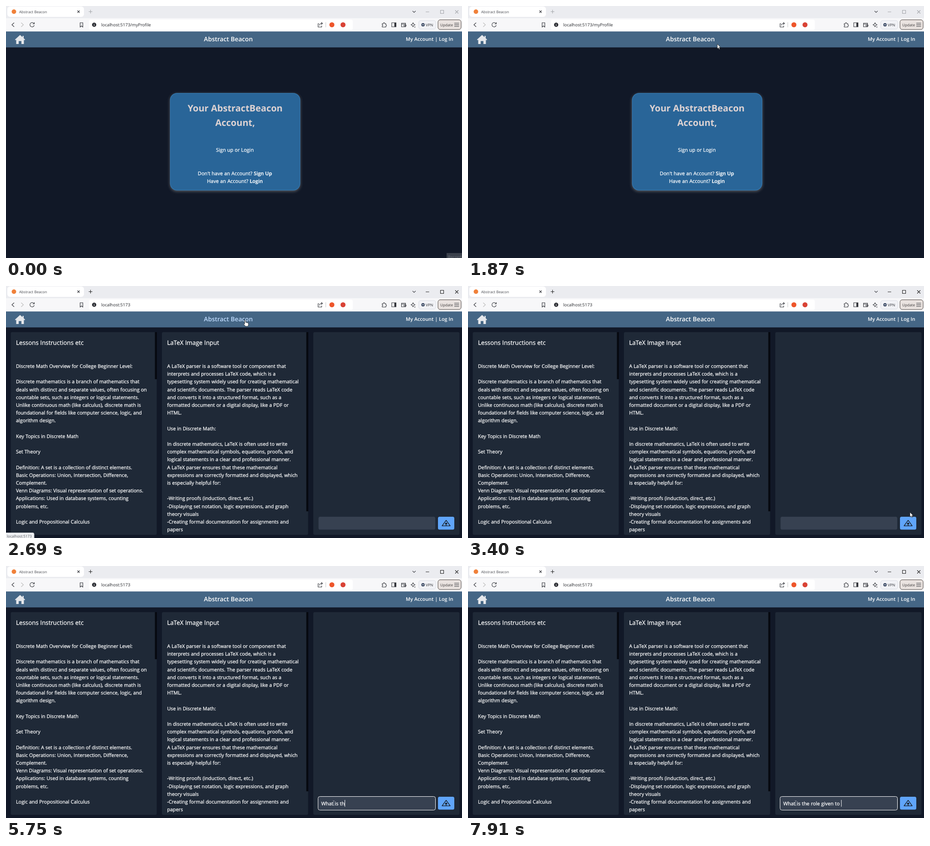
Write an HTML page that moves like this. It is 1006x557 px and loops after 8 s.

```html
<!DOCTYPE html>
<html lang="en">
<head>
<meta charset="utf-8">
<title>Abstract Beacon</title>
<style>
html, body { margin: 0; width: 100%; height: 100%; overflow: hidden; background: #111827; }
svg { display: block; width: 1006px; height: 557px; font: 10.8px "Open Sans", "Noto Sans", sans-serif; word-spacing: .2px; text-rendering: geometricPrecision; }
text { white-space: pre; }
.mid { text-anchor: middle; }
.bold { font-weight: 600; }
.line { fill: none; stroke: #33353b; stroke-width: 1.1; }
#lessons text, #profile text { stroke: #fff; stroke-width: .28px; }
#profile .heading text { stroke: none; }
#card { filter: drop-shadow(0 2px 3px #8a8a8a99); }
</style>
</head>
<body>
<svg viewBox="0 0 1006 557">
  <rect width="1006" height="557" fill="#111827"/>

  <!-- browser window -->
  <rect width="1006" height="28" fill="#ebecf0"/>
  <rect y="27" width="1006" height="30" fill="#f7f7f9"/>
  <rect x="3" y="1" width="169" height="23" rx="6" fill="#fff"/>
  <circle cx="17.5" cy="12.5" r="5" fill="#f0813a"/>
  <text x="29" y="16" font-size="8.1" fill="#44474d">Abstract Beacon</text>
  <path class="line" d="M157.5 10l5 5m0-5l-5 5"/>
  <path class="line" d="M897 11l3.3 3.3 3.3-3.3"/>
  <path id="controls" class="line" d="M182.5 12.5h8m-4-4v8M926 13h7.5M958.5 9.5h7v7h-7zM991 9.5l7 7m0-7l-7 7"/>

  <g class="line">
    <path d="M18 37l-5 4.500 5 4.500"/>
    <path d="M33.500 37l5 4.500-5 4.500" stroke="#bbb"/>
    <path d="M61.500 38.500a4.800 4.800 0 1 0 .8 4M62.500 36v3.500h-3.500"/>
    <path d="M163.500 37h6v9.500l-3-2.500-3 2.500z"/>
  </g>
  <rect x="183" y="30" width="582" height="23" rx="4" fill="#fff"/>
  <circle cx="194.5" cy="41.5" r="4.7" fill="#303238"/>
  <path d="M194.5 39v1m0 1v3" stroke="#fff"/>
  <text id="url" x="210" y="44.7" font-size="9.5" fill="#24262b"></text>
  <g class="line">
    <path d="M690.5 39h-2v7.5h8v-3M691 43c.5-3 2.5-4.5 7-4.5m-2.5-2.5l2.7 2.5-2.7 2.5"/>
    <path d="M705.5 36v11" stroke="#ccc"/>
    <path d="M830 39h2.5c-.5-3 3.5-3 3 0h2.5v2.5c2 0 2 3 0 3v2h-8v-2.5c2 0 2-2.5 0-2.5z"/>
    <path d="M851 37h9.5v9h-9.5z"/>
    <path d="M858.5 37v9" stroke-width="3.5"/>
    <path d="M872.5 38h9v8h-9zM872.5 40h9M878 42h4.5v2.5h-4.5z"/>
    <path d="M898 36.5q.7 4.3 5 5-4.3.7-5 5-.7-4.3-5-5 4.3-.7 5-5zM902 45v3"/>
  </g>
  <circle cx="719" cy="41.5" r="5.5" fill="#ee562b"/>
  <circle cx="743.5" cy="41.5" r="5.5" fill="#d94336"/>
  <rect x="910.5" y="32" width="38" height="19" rx="5" fill="#f1f2f6" stroke="#d9dce4"/>
  <circle cx="920" cy="41.5" r="3.8" fill="#42506a"/>
  <path d="M918 41.5h4" stroke="#fff"/>
  <text x="926" y="44.7" font-size="8.4" fill="#303238">VPN</text>
  <rect x="953" y="30.5" width="51" height="21.5" rx="5" fill="#e9e2df" stroke="#4d4540"/>
  <text x="958" y="44.6" font-size="8.2" fill="#3c3a3a">Update</text>
  <path class="line" d="M989 38h10.5m-10.5 3.5h10.5m-10.5 3.5h10.5"/>

  <!-- page header -->
  <rect y="56.3" width="1006" height="35.2" fill="#456685"/>
  <path fill="#e5e7eb" d="M31 64l5.5 5v-3h2.5v5.3l3.2 3-1.2 1.4-1.5-1.2v9.5h-5.5v-6.5h-6v6.5h-5.5v-9.5l-1.500 1.200-1.200-1.400z"/>
  <text id="brand" class="mid bold" y="5" font-size="13.7">Abstract Beacon</text>
  <text class="bold" x="882" y="77" fill="#fff">My Account | Log In</text>

  <g id="profile" class="mid" fill="#fff" font-size="11">
    <rect id="card" x="362.5" y="193" width="286" height="214" rx="15" fill="#296598" stroke="#3375ab" stroke-width="1.5"/>
    <g class="heading" font-size="20" font-weight="700" fill="#ded3d3">
      <text x="505.5" y="232.5">Your AbstractBeacon</text>
      <text x="505.5" y="264.7">Account,</text>
    </g>
    <text x="505" y="321.5">Sign up or Login</text>
    <text x="505" y="374">Don't have an Account? <tspan class="bold">Sign Up</tspan></text>
    <text x="505" y="391.2">Have an Account? <tspan class="bold">Login</tspan></text>
  </g>

  <g id="lessons" fill="#fff">
    <g fill="#1f2937">
      <rect x="10.5" y="102" width="322" height="448" rx="3"/>
      <rect x="344" y="102" width="322.5" height="448" rx="3"/>
      <rect x="678" y="102" width="322.5" height="448" rx="3"/>
    </g>
    <path d="M328.5 102h4.5v104h-4.5zM662.5 102h4.5v396h-4.5z" fill="#060910"/>
    <g font-size="13.35">
      <text x="22" y="129.5">Lessons Instructions etc</text>
      <text x="355.5" y="129.5">LaTeX Image Input</text>
    </g>
    <g id="columns"></g>
    <rect x="689.5" y="510" width="257.5" height="28.5" rx="3.5" fill="#374151"/>
    <rect id="ring" x="688.5" y="509.5" width="259" height="30" rx="4" fill="none" stroke="#fff"/>
    <rect id="send" x="953" y="510" width="36" height="28.5" rx="3.5"/>
    <path d="M971 517.8l9 12.400h-18zM971 530v-6.500m-2.500 3l2.500-3 2.500 3" fill="none" stroke="#111" stroke-width="1.3" stroke-linejoin="round"/>
    <text id="typed" x="695.5" y="528.5" font-size="10.9" word-spacing=".4"></text>
    <path id="caret" d="M0 517v15" stroke="#fff"/>
  </g>

  <g id="status">
    <rect x="-3" y="545.5" width="65" height="15" rx="3" fill="#eef0f3" stroke="#c4c7cc"/>
    <text x="2" y="556" font-size="8.15" fill="#55585e">localhost:5173</text>
  </g>
  <g id="recorder">
    <rect x="972" y="546" width="34" height="11" fill="#3a404b"/>
    <text x="975" y="558" font-size="9" fill="#686e78">Recording</text>
  </g>

  <circle id="click" cx="527.5" cy="77" r="8.3" fill="#cfc81c" opacity=".8"/>
  <g id="cursor" stroke="#111" stroke-width=".7" fill="#fff">
    <path id="arrow" d="M0 0V10.5L2.4 8.3 4 12 5.7 11.3 4.1 7.7H7.3Z"/>
    <path id="hand" d="M-1 .5Q.2-1 1.3.5V4.5Q2.7 3.8 3.5 5 5 4.4 5.6 5.7 7.2 5.4 7.3 7V9.5Q7 11.5 6 13H.5Q-1 10.5-3.2 8.3-3.2 6.5-1 8Z"/>
    <path id="beam" d="M-2-5h4M0-5V5M-2 5h4" fill="none" stroke="#e5e7eb" stroke-width=".9" opacity=".55"/>
  </g>
</svg>
<script>
const $ = id => document.getElementById(id);
const show = (id, on) => $(id).setAttribute('visibility', on ? 'inherit' : 'hidden');
const set = (id, name, value) => $(id).setAttribute(name, value);

const leftText = `Discrete Math Overview for College Beginner Level:

Discrete mathematics is a branch of mathematics that
deals with distinct and separate values, often focusing on
countable sets, such as integers or logical statements.
Unlike continuous math (like calculus), discrete math is
foundational for fields like computer science, logic, and
algorithm design.

Key Topics in Discrete Math

Set Theory

Definition: A set is a collection of distinct elements.
Basic Operations: Union, Intersection, Difference,
Complement.
Venn Diagrams: Visual representation of set operations.
Applications: Used in database systems, counting
problems, etc.

Logic and Propositional Calculus`;

const rightText = `A LaTeX parser is a software tool or component that
interprets and processes LaTeX code, which is a
typesetting system widely used for creating mathematical
and scientific documents. The parser reads LaTeX code
and converts it into a structured format, such as a
formatted document or a digital display, like a PDF or
HTML.

Use in Discrete Math:

In discrete mathematics, LaTeX is often used to write
complex mathematical symbols, equations, proofs, and
logical statements in a clear and professional manner.
A LaTeX parser ensures that these mathematical
expressions are correctly formatted and displayed, which
is especially helpful for:

-Writing proofs (induction, direct, etc.)
-Displaying set notation, logic expressions, and graph
theory visuals
-Creating formal documentation for assignments and
papers`;

const column = (x, copy) => copy.split('\n')
  .map((line, i) => `<text x="${x}" y="${181 + 17.2 * i}">${line}</text>`).join('');
$('columns').innerHTML = column(22, leftText) + column(355.5, rightText);

// pointer stops: time, x, y
const stops = [
  [0, -50, -50], [170, 905, 470], [330, 755, 360],
  [700, 640, 330], [860, 442, 262], [1030, 540, 170], [1190, 691, 105],
  [1520, 672, 100], [1690, 610, 94], [1860, 550, 84], [2030, 527.5, 76],
  [2860, 560, 140], [3040, 680, 310], [3210, 850, 450], [3380, 975, 500],
  [3570, 967, 520], [3740, 850, 522], [3900, 723, 524]
];

// typing bursts: start time, then the text length after each step
const phrase = 'What is the role given to ';
const bursts = [
  [4590, [1, 2, 4, 5, 6, 7, 8]],
  [5750, [10, 11, 12, 13, 14, 16, 17]],
  [6900, [18, 20, 22, 23, 24, 25, 26]]
];
const typedLength = t => {
  const burst = bursts.findLast(b => t >= b[0]);
  if (!burst) return 0;
  const step = Math.floor((t - burst[0]) / 163);
  return burst[1][Math.min(step, 6)];
};

function draw(t) {
  const home = t >= 2690;
  const [, x, y] = stops.findLast(s => t >= s[0]);
  const overTitle = t >= 2030 && t < 2860;
  const overSend = home && y > 509 && x > 952;
  const overField = home && y > 509 && !overSend;
  const pressed = t >= 2540 && !home;
  const focused = t >= 4070;

  show('profile', !home);
  show('lessons', home);
  show('recorder', t < 170);
  show('status', t >= 2200 && t < 3040);
  show('click', pressed);
  $('url').textContent = 'localhost:5173' + (home ? '' : '/myProfile');
  $('controls').style.stroke = t < 2540 ? '#a3a5aa' : '#222';
  set('brand', 'transform', `translate(490.5 73) scale(${pressed ? .91 : 1})`);
  set('brand', 'fill', overTitle ? '#bfdbfe' : '#fff');

  set('cursor', 'transform', `translate(${x} ${y})`);
  show('hand', overTitle || overSend);
  show('beam', overField);
  show('arrow', !overTitle && !overSend && !overField);

  set('send', 'fill', overSend ? '#3b82f6' : '#60a5fa');
  show('ring', focused);
  $('typed').textContent = phrase.slice(0, typedLength(t));
  show('caret', focused);
  set('caret', 'transform', `translate(${696 + $('typed').getComputedTextLength()} 0)`);
}

const start = performance.now();
function tick() {
  draw((performance.now() - start) % 8000);
  requestAnimationFrame(tick);
}
tick();
</script>
</body>
</html>
```
